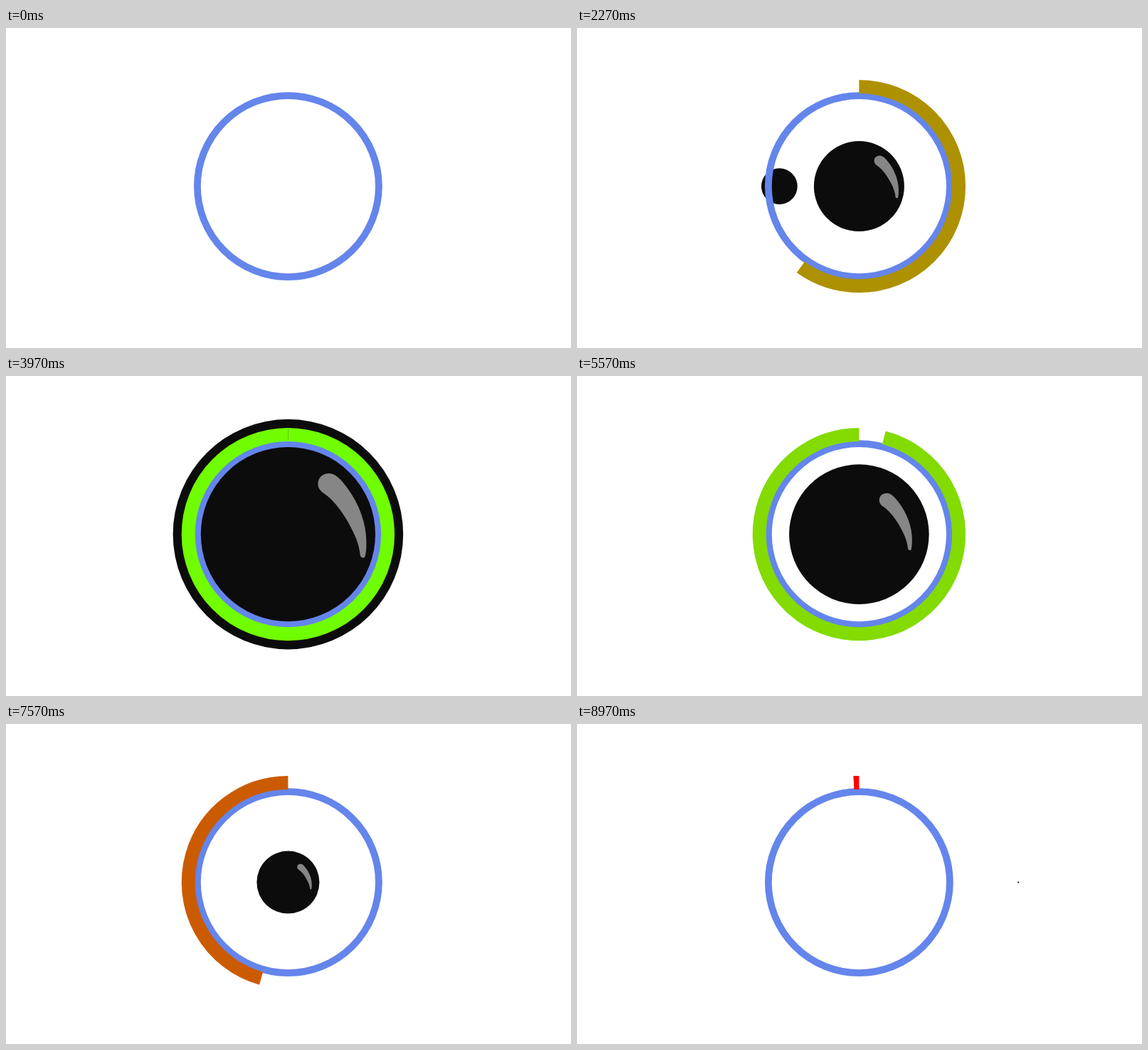
An HTML page with a canvas that plays this animation: 794x450 px, repeating every 9010 ms.

```html
<!DOCTYPE html>
<html>
<head>
<meta charset="utf-8">
<style>
html, body { margin: 0; width: 100%; height: 100%; overflow: hidden; background: #fff; }
canvas { display: block; }
</style>
</head>
<body>
<canvas id="stage" width="794" height="450"></canvas>
<script>
const ctx = document.getElementById('stage').getContext('2d');
const LOOP = 9010, CX = 396.4, CY = 222.6;
const UNIT = 12.7, BALL = 25.4, TRAVEL = 224, FULL = 9.9, BEAT = 15;
const INK = '#0c0c0c';
const shine = new Path2D('M42-70.5C42-80 49-85.5 57-85.5C66-85.5 73-79 84-64C100-42 110-15 110 10C110 18 110 24 108.5 30C108 34.5 102.5 34 101.5 30C100 17 97 7 88-10C78-30 64-48 51-57C46-60 42-65 42-70.5Z');

const clamp = v => Math.min(1, Math.max(0, v));
const mix = (a, b, k) => a + (b - a) * k;
const smooth = v => { v = clamp(v); return v * v * (3 - 2 * v); };

// Eased start, straight end: bezier (1/3, 0) (.78, .78)
function easeIn(x) {
  let lo = 0, hi = 1, y = 0;
  for (let i = 0; i < 24; i++) {
    const t = (lo + hi) / 2;
    y = 2.34 * t * t * (1 - t) + t ** 3;
    if (y + t * (1 - t) ** 2 < x) lo = t; else hi = t;
  }
  return y;
}

function disc(x, r) {
  if (r <= 0) return;
  ctx.fillStyle = INK;
  ctx.beginPath();
  ctx.arc(x, CY, r, 0, 7);
  ctx.fill();
}

function stroke(r, width, color, from, to) {
  ctx.strokeStyle = color;
  ctx.lineWidth = width;
  ctx.beginPath();
  ctx.arc(CX, CY, r, (from - .25) * 2 * Math.PI, (to - .25) * 2 * Math.PI);
  ctx.stroke();
}

function body(size, gloss) {
  disc(CX, size * UNIT);
  if (gloss <= 0) return;
  ctx.save();
  ctx.translate(CX, CY);
  ctx.scale(gloss / FULL, gloss / FULL);
  ctx.fillStyle = '#868686';
  ctx.fill(shine);
  ctx.restore();
}

// Size after n balls have arrived / left
const grown = n => n < 1 ? 0 : n > 7 ? FULL : n + 1;
const shrunk = n => n < 1 ? FULL : n > 7 ? 0 : 8.55 - .925 * n;

function fillUp(f) {
  const n = Math.floor((f - 1) / BEAT);
  if (f >= 1 && n < 8) {
    const u = (f - 1 - n * BEAT) / 14;
    disc(CX - TRAVEL * (1 - smooth(u)), BALL);
  }
  const hit = Math.min(7, Math.floor((f - 12) / BEAT));
  if (hit < 0) return;
  const age = f - 12 - hit * BEAT;
  const last = hit === 7;
  const old = grown(hit), now = grown(hit + 1);
  const peak = now * (last ? 1.55 : 1.28);
  const size = age < 3.1
    ? mix(old, peak, age / 3.1)
    : mix(peak, now, smooth((age - 3.1) / (last ? 9.9 : 7.9)));
  body(size, mix(old, now, clamp(age / 2)));
}

function drain(f) {
  const n = Math.min(7, Math.floor(f / BEAT));
  const age = f - n * BEAT, u = age / 14.3;
  if (u < 1) disc(CX + TRAVEL * smooth(u), BALL * Math.min(1, 2 - 2 * u));
  if (n === 7) return;
  const level = mix(shrunk(n), shrunk(n + 1), clamp(age / 2));
  const bump = age < 3 ? age / 3 : 1 - smooth((age - 3) / 8);
  body(level * (1 + .2328 * bump), level);
}

function draw(f) {
  ctx.fillStyle = '#fff';
  ctx.fillRect(0, 0, 794, 450);
  const out = f >= 150;
  if (out) drain(f - 150); else fillUp(f);
  stroke(127.5, 9.8, '#6485eb', 0, 1);

  const p = clamp((out ? f - 150 : f) / 120);
  const tint = out ? 1 - p : p;
  const from = out ? easeIn(p) : 0, to = out ? 1 : smooth(p);
  if (to > from)
    stroke(140.2, 19, `rgb(${mix(255, 111, tint)},${mix(0, 255, tint)},0)`, from, to);
}

function tick() {
  const t = performance.now() % LOOP;
  draw(Math.min(269, Math.floor(t * .03 + .1)));
  requestAnimationFrame(tick);
}
tick();
</script>
</body>
</html>
```
